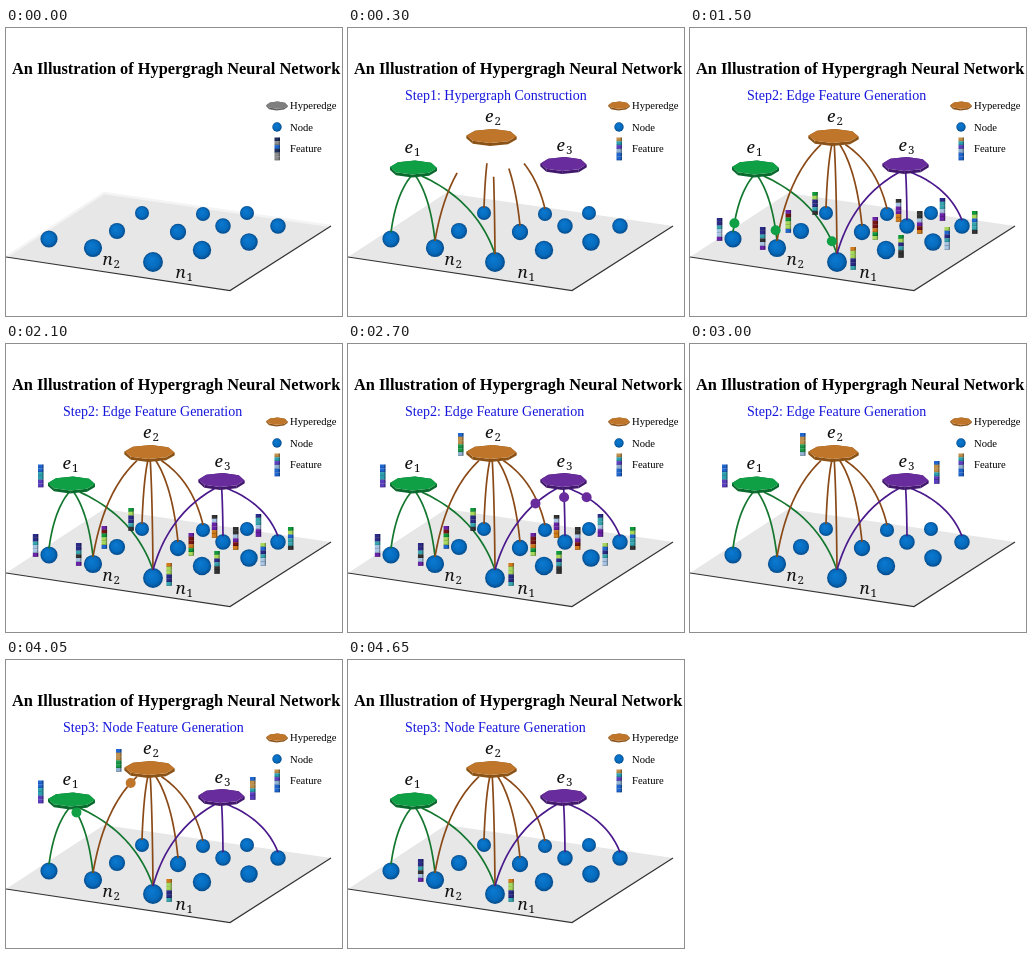
Write an HTML page with a canvas that moves like this. It is 336x288 px and loops after 4.8 s.

```html
<!DOCTYPE html>
<html lang="en">
<head>
<meta charset="utf-8">
<style>
html, body { margin: 0; width: 336px; height: 288px; overflow: hidden; background: #fff; }
canvas { display: block; }
</style>
</head>
<body>
<canvas id="stage" width="336" height="288"></canvas>
<script>
const ctx = document.getElementById('stage').getContext('2d');
const STEP = 150, COUNT = 32;
const SERIF = '"Liberation Serif", "Times New Roman", serif';
const MATH = '"Noto Serif", serif';

const GREEN = { top: '#0f9f45', side: '#0a6a2e', line: '#14772f' };
const ORANGE = { top: '#c0762a', side: '#8a5216', line: '#8a4a18' };
const PURPLE = { top: '#682c9c', side: '#41186c', line: '#4a1a8c' };
const GRAY = { top: '#7f7f7f', side: '#5c5c5c' };

const MIXED = ['#6a22a8', '#7a1515', '#d07a1a', '#0f9a3a', '#a6d85a', '#1f66d0', '#2a2a88', '#35a5b0', '#333', '#a8c4e4'];
const COOL = ['#1f66d0', '#c0904a', '#2aa0b0', '#1c9a4a', '#5a3fc0', '#8fb0d0'];
const BLUES = ['#1f66d0', '#20305a', '#8c8c8c', '#1470c8'];

// Nearer nodes, lower on the plane, are larger
const nodes = [
  [147, 234], [87, 220], [43, 211], [111, 203], [136, 185], [172, 204],
  [197, 186], [217, 198], [241, 185], [272, 198], [243, 214], [196, 222]
].map(([x, y]) => ({ x, y, r: 7 + (y - 185) * .06 }));

// spread: how far the links fan out under the disc; n1, n2 index into links
const edges = [
  { x: 65.5, y: 141, rx: 23.5, spread: .1, ink: GREEN, ends: [0, 1, 2] },
  { x: 143.5, y: 109.5, rx: 25, spread: .22, ink: ORANGE, ends: [0, 1, 4, 5, 6] },
  { x: 215.5, y: 137.5, rx: 23, spread: .1, ink: PURPLE, ends: [0, 7, 9] }
];
edges.forEach(e => { e.links = e.ends.map(i => makeLink(e, nodes[i])); });

function mix(a, b, t) {
  return a + (b - a) * t;
}

function makeLink(e, node) {
  const x = mix(e.x, node.x, e.spread), y = e.y + 7;
  const endY = node.y - node.r + 2;
  return [x, y, mix(x, node.x, .75), mix(y, endY, .32), node.x, endY];
}

function along([ax, ay, bx, by, cx, cy], t) {
  return [
    mix(mix(ax, bx, t), mix(bx, cx, t), t),
    mix(mix(ay, by, t), mix(by, cy, t), t)
  ];
}

function random(seed) {
  const v = Math.sin(seed * 12.9898) * 43758.5453;
  return v - Math.floor(v);
}

function write(str, x, y, font, color = '#000') {
  ctx.font = font;
  ctx.fillStyle = color;
  ctx.fillText(str, x, y);
}

function label(letter, sub, x, y) {
  write(letter, x, y, `italic 17px ${MATH}`, '#111');
  write(sub, x + (letter === 'n' ? 11 : 9.5), y + 3, `11.5px ${MATH}`, '#111');
}

function path(points) {
  ctx.beginPath();
  points.forEach(([x, y]) => ctx.lineTo(x, y));
}

function stroke(points, color, width) {
  path(points);
  ctx.strokeStyle = color;
  ctx.lineWidth = width;
  ctx.stroke();
}

function plane(first) {
  const left = [0, 229], back = [98, 165], right = [325, 198], front = [224, 262.5];
  path([left, back, right, front]);
  ctx.fillStyle = '#e7e7e7';
  ctx.fill();
  if (first) stroke([left, back, right], '#f4f4f4', 2.5);
  stroke([left, front, right], '#333', 1.2);
}

function dot(x, y, r, fill) {
  ctx.beginPath();
  ctx.arc(x, y, r, 0, 7);
  ctx.fillStyle = fill;
  ctx.fill();
}

function ball({ x, y, r }) {
  const g = ctx.createRadialGradient(x - r * .2, y - r * .3, r * .1, x, y, r);
  g.addColorStop(0, '#0a78cf');
  g.addColorStop(.65, '#066bbd');
  g.addColorStop(1, '#044a8a');
  dot(x, y, r, g);
}

function disc(x, y, rx, ry, depth, ink) {
  const ring = dy => Array.from({ length: 8 }, (_, i) => {
    const a = i * Math.PI / 4 + .06;
    return [x + rx * Math.cos(a), y + dy + ry * Math.sin(a)];
  });
  const top = ring(-depth / 2), low = ring(depth / 2);
  ctx.fillStyle = ink.side;
  for (let i = 0; i < 8; i++) {
    const j = (i + 1) % 8;
    path([top[i], top[j], low[j], low[i]]);
    ctx.fill();
  }
  path(top);
  ctx.fillStyle = ink.top;
  ctx.fill();
}

// Grows upward from the node
function drawLink(curve, part, color) {
  if (part <= 0) return;
  stroke(Array.from({ length: 25 }, (_, i) => along(curve, 1 - part * i / 24)), color, 1.7);
}

// A stack of six small cubes
function column(x, top, palette) {
  const first = Math.floor(random(x) * palette.length);
  for (let i = 0; i < 6; i++) {
    const y = top + i * 3.8;
    const hop = Math.floor(random(x + i * 7) * 2);
    ctx.fillStyle = palette[(first + i + hop) % palette.length];
    ctx.fillRect(x - 2.5, y, 5.5, 3.8);
    ctx.fillStyle = 'rgba(0,0,0,.35)';
    ctx.fillRect(x + 1.7, y, 1.3, 3.8);
    ctx.fillRect(x - 2.5, y + 3.2, 4.2, .6);
  }
}

function nodeFeature({ x, y, r }) {
  const left = x < 140;
  column(x + (left ? -1.6 : 1.6) * r, y - (left ? 21 : 15), MIXED);
}

function edgeFeature({ x, y }) {
  column(x + (x < 200 ? -31 : 31), y - 20.5, COOL);
}

function legend(first) {
  disc(271, 78, 10.5, 3.6, 1.6, first ? GRAY : ORANGE);
  ball({ x: 271, y: 99, r: 4.7 });
  column(271, 109.5, first ? BLUES : COOL);
  ['Hyperedge', 'Node', 'Feature'].forEach((s, i) =>
    write(s, 284, 81 + i * 21.5, `10.6px ${SERIF}`));
}

function titles(k) {
  write('An Illustration of Hypergragh Neural Network', 6, 46.4, `bold 16.35px ${SERIF}`);
  if (k < 1) return;
  const s = k < 8 ? 'Step1: Hypergraph Construction'
    : k < 22 ? 'Step2: Edge Feature Generation' : 'Step3: Node Feature Generation';
  write(s, 57, 72.3, `14px ${SERIF}`, '#1616dc');
}

function ride(e, link, t) {
  if (link && t > 0 && t < 1) dot(...along(link, t), 5, e.ink.top);
}

function travellers(k) {
  const departs = [10, 15, 17], arrives = [14, 17, 19];
  edges.forEach((e, i) => {
    const t = (k + .5 - departs[i]) / (arrives[i] - departs[i]);
    e.links.forEach(link => ride(e, link, 1 - t));
    // Down to n1, then to n2
    ride(e, e.links[0], .1 + (k - 23) * .35);
    if (e.ends[1] === 1) ride(e, e.links[1], .1 + (k - 27) * .35);
    if (k >= arrives[i] && k < 31) edgeFeature(e);
  });
}

function features(k) {
  if (k >= 5 && k < 20) nodes.forEach(nodeFeature);
  if (k >= 26) nodeFeature(nodes[0]);
  if (k >= 30) nodeFeature(nodes[1]);
}

function network(k) {
  edges.forEach((e, i) => {
    const part = Math.min(1, k - i - .38);
    e.links.forEach(link => drawLink(link, part, e.ink.line));
  });
  edges.forEach(e => disc(e.x, e.y, e.rx, 7, 3, e.ink));
  label('e', '1', 56.5, 125);
  label('e', '2', 137, 94);
  label('e', '3', 208.5, 123);
  travellers(k);
  features(k);
}

function draw(k) {
  const first = k === 0;
  ctx.fillStyle = '#fff';
  ctx.fillRect(0, 0, 336, 288);
  plane(first);
  nodes.forEach(ball);
  if (!first) network(k);
  label('n', '2', 96.5, 237);
  label('n', '1', 169.5, 249.5);
  legend(first);
  titles(k);
}

const start = performance.now();
function tick() {
  draw(Math.floor(Math.max(0, performance.now() - start) / STEP) % COUNT);
  requestAnimationFrame(tick);
}
tick();
</script>
</body>
</html>
```
